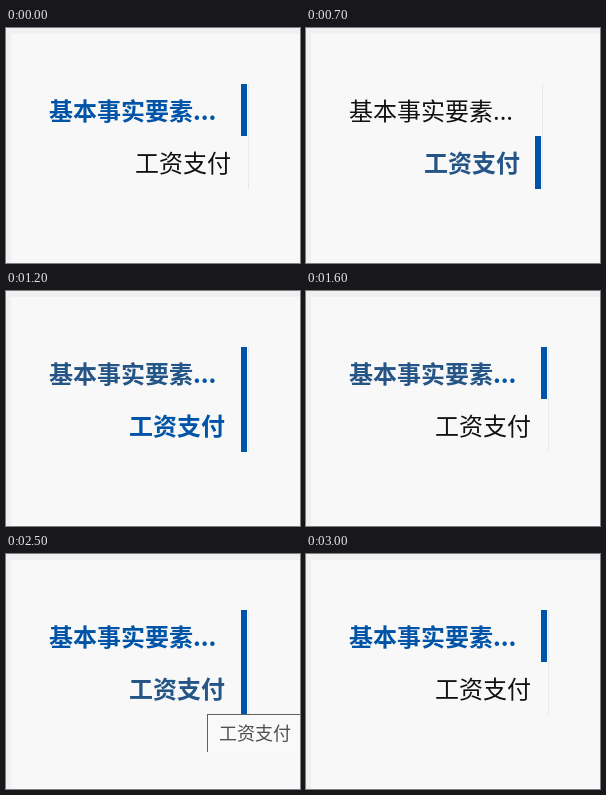
An HTML page for the animation above (3600 ms loop, 294 by 235 pixels).

```html
<!DOCTYPE html>
<html lang="zh-CN">
<head>
<meta charset="utf-8">
<title>Menu selection</title>
<style>
  html, body { margin: 0; width: 100%; height: 100%; overflow: hidden; background: #f0f0f0; }
  svg { display: block; width: 294px; height: 235px; }
  text { font-family: "Noto Sans CJK SC", "Noto Sans CJK", sans-serif; font-size: 24px; }
  #tip text { font-size: 18px; font-weight: 300; fill: #505050; }
</style>
</head>
<body>
<svg viewBox="0 0 294 235" xmlns="http://www.w3.org/2000/svg">
  <rect x="5" y="6" width="289" height="229" fill="#f8f8f8"/>
  <g shape-rendering="crispEdges">
    <rect id="line" y="56" width="1" height="105" fill="#e9e9e9"/>
    <rect id="bar" width="6" fill="#0054a7"/>
  </g>
  <text id="first" x="43" y="92">基本事实要素</text>
  <text id="dots" x="187" y="92">...</text>
  <text id="second" y="144">工资支付</text>
  <g id="tip">
    <rect x="201" y="160" width="93" height="38" fill="#f9f9f9" shape-rendering="crispEdges"/>
    <path d="M201.5 198V160.5H294" fill="none" stroke="#606060" shape-rendering="crispEdges"/>
    <text x="213" y="186">工资支付</text>
  </g>
</svg>
<script>
const LOOP = 3600;
const BLUE = '#0054a7', HOVER = '#245586', BLACK = '#000', PLAIN = '#111';
const TOP = 56, MID = 108, END = 161;
const el = id => document.getElementById(id);

// Each entry holds until the next one; a null colour means not selected.
const steps = [
  { at: 0, first: BLUE, second: null },
  { at: 200, first: BLUE, second: HOVER },
  { at: 700, first: null, second: HOVER },
  { at: 1000, first: BLACK, second: BLUE },
  { at: 1200, first: HOVER, second: BLUE },
  { at: 1600, first: HOVER, second: null },
  { at: 1800, first: BLUE, second: null },
  { at: 1900, first: BLUE, second: HOVER },
  { at: 2500, first: BLUE, second: HOVER, tip: true },
  { at: 2600, first: BLUE, second: BLUE },
  { at: 3000, first: BLUE, second: null }
];

function set(id, attrs) {
  for (const key in attrs) el(id).setAttribute(key, attrs[key]);
}

function label(id, color) {
  set(id, { fill: color || PLAIN, 'font-weight': color ? 700 : 300 });
}

function draw(time) {
  const t = time % LOOP;
  const { first, second, tip } = steps.filter(s => s.at <= t).pop();

  label('first', first);
  label('dots', first && BLUE);
  label('second', second);
  set('second', { x: !second ? 129 : first ? 123 : 118 });

  const edge = first ? 235 : 229;
  const top = first ? TOP : MID;
  set('bar', { x: edge, y: top, height: (second ? END : MID) - top });
  set('line', { x: edge + 7 });
  set('tip', { visibility: tip ? 'visible' : 'hidden' });
}

const start = performance.now();
function tick() {
  draw(performance.now() - start);
  requestAnimationFrame(tick);
}
tick();
</script>
</body>
</html>
```
